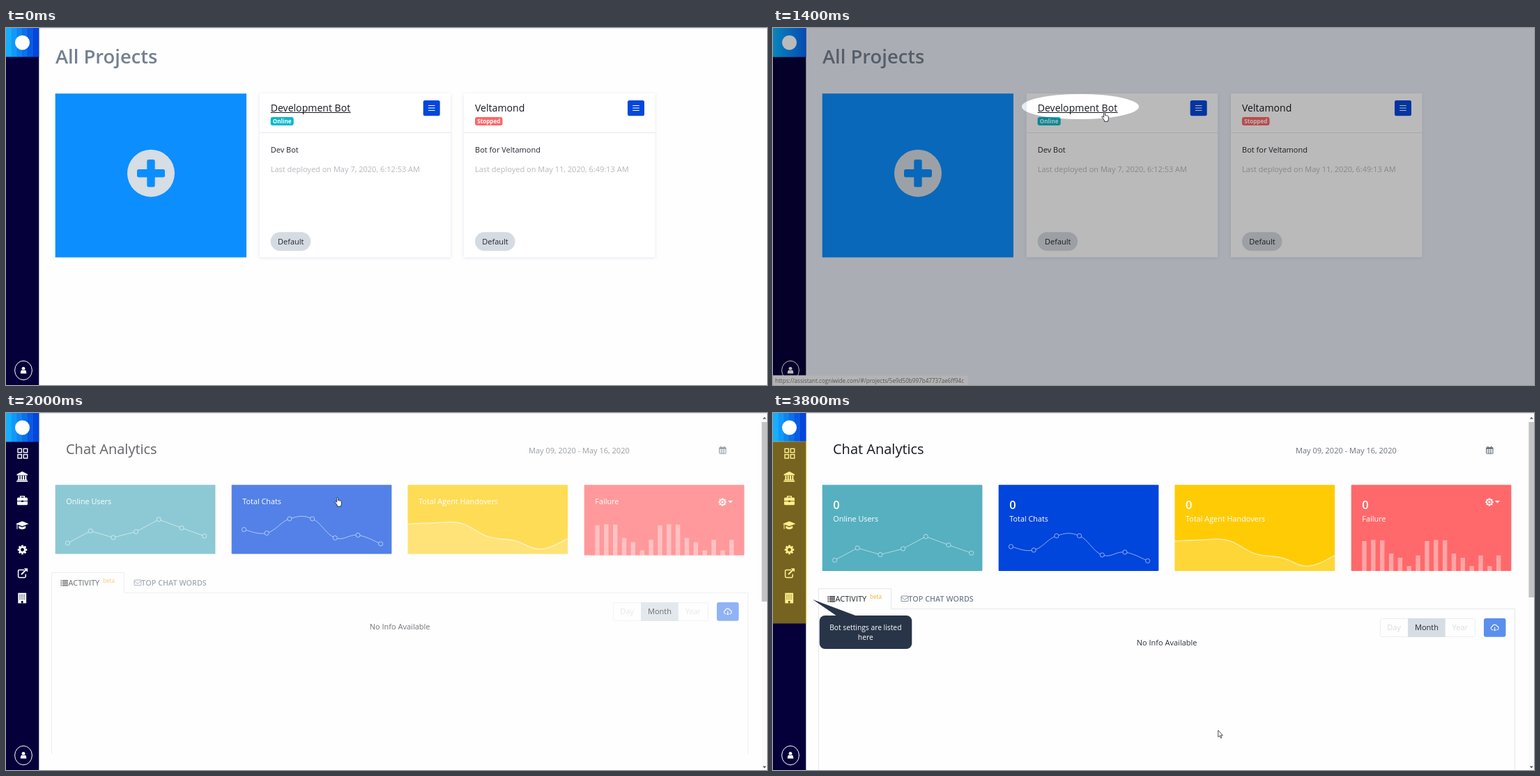
Write an HTML page that moves like this. It is 1092x513 px and loops after 4 s.

```html
<!DOCTYPE html>
<html lang="en">
<head>
<meta charset="utf-8">
<title>Bot dashboard</title>
<style>
html, body { margin: 0; width: 100%; height: 100%; overflow: hidden; background: #fefefe; }
svg { display: block; width: 1092px; height: 513px; font-family: 'Open Sans', sans-serif; }
.card { filter: drop-shadow(0 1px 2px rgba(40, 60, 130, .13)); }
</style>
</head>
<body>
<svg id="stage" viewBox="0 0 1092 513" xmlns="http://www.w3.org/2000/svg"></svg>
<script>
const stage = document.getElementById('stage');
const LOOP = 4000, STEP = 200;
const URL_TEXT = 'https://assistant.cogniwide.com/#/projects/5e9d50b997b47737ae6ff94c';

// Markup helpers
const rect = (x, y, w, h, fill, extra = '') =>
  `<rect x="${x}" y="${y}" width="${w}" height="${h}" fill="${fill}" ${extra}/>`;
const text = (x, y, size, fill, str, extra = '') =>
  `<text x="${x}" y="${y}" font-size="${size}" fill="${fill}" ${extra}>${str}</text>`;
const path = (d, extra = '') => `<path d="${d}" ${extra}/>`;
const line = (d, color, w = 1) => path(d, `fill="none" stroke="${color}" stroke-width="${w}"`);
const group = (id, body, extra = '') => `<g id="${id}" ${extra}>${body}</g>`;
const repeat = (n, fn) => Array.from({ length: n }, (_, i) => fn(i)).join('');

function gear(cx, cy, r, fill, hole) {
  const teeth = repeat(8, i =>
    rect(cx - r * .22, cy - r, r * .44, r, fill, `transform="rotate(${i * 45} ${cx} ${cy})"`));
  return teeth + `<circle cx="${cx}" cy="${cy}" r="${r * .76}" fill="${fill}"/>` +
    `<circle cx="${cx}" cy="${cy}" r="${r * .36}" fill="${hole}"/>`;
}

// Curve through points; k = 0 gives straight segments
function curve(pts, k) {
  const slope = i => {
    const a = pts[Math.max(i - 1, 0)], b = pts[Math.min(i + 1, pts.length - 1)];
    return [(b[0] - a[0]) * k, (b[1] - a[1]) * k];
  };
  return pts.map((p, i) => {
    if (!i) return `M${p}`;
    const q = pts[i - 1], s = slope(i - 1), e = slope(i);
    return `C${q[0] + s[0]} ${q[1] + s[1]} ${p[0] - e[0]} ${p[1] - e[1]} ${p}`;
  }).join('');
}

// Project list
function projectCard(x, name, state, color, stateW, about, when, underline) {
  const tx = x + 16;
  return rect(x, 94, 274.5, 235.5, '#fff', 'class="card"') +
    rect(x, 150, 274.5, 1, '#e6e8ec') +
    text(tx, 119.5, 14.1, '#15181f', name) +
    (underline ? rect(tx, 121, 115, 1, '#15181f') : '') +
    rect(tx, 128, stateW, 12, color, 'rx="3"') +
    text(tx + stateW / 2, 137, 8.1, '#fff', state, 'font-weight="700" text-anchor="middle"') +
    rect(x + 235, 104, 24, 22.3, '#0447dc', 'rx="2.5"') +
    repeat(3, i => rect(x + 242.2, 111 + i * 3.5, 9.6, 1, '#fff')) +
    text(tx, 178.5, 11, '#23272f', about) +
    text(tx, 207, 11, '#b4b8bd', 'Last deployed on ' + when) +
    rect(tx, 293.3, 57.5, 27, '#d5dbe2', 'rx="13.5"') +
    text(tx + 10.3, 311, 11, '#23272f', 'Default');
}

const projects =
  text(71, 50.5, 27.4, '#74808f', 'All Projects', 'font-weight="600"') +
  rect(70.7, 94.2, 274.3, 235.4, '#0c8eff') +
  '<circle cx="208" cy="208.7" r="34" fill="#d6dde4"/>' +
  rect(188, 203, 40, 11.4, '#0c8eff', 'rx="2.5"') +
  rect(202.3, 189, 11.4, 39.4, '#0c8eff', 'rx="2.5"') +
  projectCard(363.7, 'Development Bot', 'Online', '#07b9cb', 33, 'Dev Bot',
    'May 7, 2020, 6:12:53 AM', true) +
  projectCard(657, 'Veltamond', 'Stopped', '#ff6668', 39.5, 'Bot for Veltamond',
    'May 11, 2020, 6:49:13 AM', false);

// Side menu
const NAVY = '#05003a';
const bands = 6;
const mix = (a, b, u) => Math.round(a + (b - a) * u);
const tile = repeat(bands, i => {
  const u = i / (bands - 1);
  return rect(i * 47 / bands, 0, 47 / bands + .3, 41.5,
    `rgb(${mix(22, 4, u)},${mix(174, 70, u)},${mix(255, 222, u)})`);
});

const menu =
  repeat(4, i => rect(17 + i % 2 * 8.3, 51.3 + (i >> 1) * 8.3, 5.4, 5.4, 'none',
    'stroke="#fff" stroke-width="1.4"')) +
  path('M23.3 84L31 88V89.4H15.5V88Z', 'fill="#fff"') +
  repeat(4, i => rect(17.4 + i * 3.3, 90, 2, 6, '#fff')) +
  rect(16.3, 95.6, 14, 1.3, '#fff') + rect(15.2, 97.4, 16, 1.6, '#fff') +
  rect(16, 121.5, 15, 10.8, '#fff', 'rx="1.5"') +
  line('M20.7 122V119.6H26.3V122', '#fff', 1.4) +
  rect(16, 126.3, 15, .9, NAVY) + rect(22, 125.7, 3, 2.2, NAVY) +
  path('M14 159.2L23.3 155.6L32.5 159.2L23.3 162.8Z', 'fill="#fff"') +
  path('M18.3 162.2V165.4Q23.3 169 28.2 165.4V162.2L23.3 164.2Z', 'fill="#fff"') +
  line('M16 160V166.8', '#fff', 1.1) +
  gear(23.5, 196.5, 6.7, '#fff', NAVY) +
  line('M26 225.4H19.2Q17.6 225.4 17.6 227V234.8Q17.6 236.4 19.2 236.4H26.6Q28.2 236.4 28.2 234.8V231.5', '#fff', 1.5) +
  line('M22 232L29 225', '#fff', 1.9) +
  path('M25.6 223.2H31V228.6Z', 'fill="#fff"') +
  rect(17.3, 258.6, 11.8, 14.8, '#fff') +
  repeat(12, i => rect(19.2 + i % 4 * 2.3, 261 + (i >> 2) * 2.7, 1.1, 1.3, NAVY)) +
  rect(21.9, 270, 2.6, 3.4, NAVY);

const user =
  '<ellipse cx="25" cy="492" rx="12.4" ry="13.7" fill="none" stroke="#fff" stroke-width="1"/>' +
  '<circle cx="25" cy="489.3" r="2.4" fill="#fff"/>' +
  path('M20.8 496.6Q20.8 491.4 23 491.4Q25 493 27 491.4Q29.3 491.4 29.3 496.6Z', 'fill="#fff"');

const sidebar =
  rect(0, 0, 47.3, 513, NAVY) + group('tile', tile) +
  rect(0, 0, 47.3, 41.5, 'url(#sky)', 'id="smooth"') +
  '<circle cx="23.5" cy="21" r="10.5" fill="#fff"/>' + group('menu', menu) + user;

// Dashboard
const SOFT = 'rgba(255,255,255,.55)';
const level = v => 226.5 - .545 * v;
const week = [78, 81, 80, 45, 34, 12, 40];
const spread = (x, step, ys) => ys.map((y, i) => [x + i * step, y]);

function dotted(pts, fill, k) {
  return line(curve(pts, k), SOFT) + pts.map(([x, y]) =>
    `<circle cx="${x}" cy="${y}" r="3.1" fill="${fill}" stroke="${SOFT}"/>`).join('');
}

const area = spread(576.5, 38.3, week.map(level));
const cards = [
  [70.7, '#56b0c0', 'Online Users',
    dotted(spread(88.5, 32.7, [211.5, 194, 203.5, 195, 177.5, 189.7, 201.3]), '#56b0c0', 0)],
  [323.7, '#0045dc', 'Total Chats',
    dotted(spread(341.5, 32.7, [192, 197, 176.5, 176.5, 204, 200, 212.5]), '#0045dc', .2)],
  [576.5, '#ffcb05', 'Total Agent Handovers',
    path(curve(area, .2) + 'V227H576.5Z', 'fill="rgba(255,255,255,.2)"') + line(curve(area, .2), SOFT, 1.6)],
  [829.7, '#ff696b', 'Failure',
    repeat(16, i => {
      const y = level(week[i < 14 ? i % 7 : i - 9]);
      return rect(845.3 + i * 12.85, y, 6.4, 227 - y, 'rgba(255,255,255,.4)');
    })]
];

const cardMarkup = cards.map(([x, color, label, chart], i) =>
  rect(x, 103.3, 229.7, 123.7, color, `id="box${i}" rx="1"`) +
  group('chart' + i, chart) +
  text(x + 15.6, 138, 16.5, '#fff', '0', 'class="count" font-weight="600"') +
  text(x + 15.6, 156, 10.85, '#fff', label, 'class="label" font-weight="500"')).join('');

const GREY = '#6c7783';
const calendar =
  rect(1023.5, 49.5, 9.6, 9, 'none', `stroke="${GREY}" rx="1"`) +
  rect(1023.5, 49.5, 9.6, 2.5, GREY) +
  rect(1025.2, 47.6, 1.4, 3, GREY) + rect(1030, 47.6, 1.4, 3, GREY) +
  repeat(2, i => rect(1024, 53.7 + i * 2.4, 8.6, .7, GREY)) +
  repeat(2, i => rect(1026.4 + i * 3, 52, .7, 6.5, GREY));

const panel =
  line('M65.5 513V252.5H169.5V281.5H1064.5V513', '#e4e7eb') +
  repeat(4, i => rect(78.5, 263 + i * 2.4, 1.6, 1.4, '#23282c') +
    rect(81, 263 + i * 2.4, 8, 1.4, '#23282c')) +
  text(89.5, 271, 11, '#23282c', 'ACTIVITY', 'font-weight="500"') +
  text(139, 267, 8.2, '#f7b02c', 'beta') +
  rect(184, 263, 10, 7.6, 'none', 'stroke="#7b8591" stroke-width=".9" rx="1"') +
  line('M184 264.5L189 268.3L194 264.5', '#7b8591', .9) +
  text(194.3, 271, 10.8, '#768090', 'TOP CHAT WORDS', 'font-weight="600"') +
  rect(871.5, 295.5, 136, 26, 'none', 'stroke="#eceef1" rx="2"') +
  rect(911, 295, 53.7, 27, '#d6dde5') +
  text(881.3, 312, 11, '#d9dde1', 'Day') +
  text(921, 312, 11, '#23282c', 'Month') +
  text(974.7, 312, 11, '#d9dde1', 'Year') +
  rect(1020, 295, 31.5, 26.7, '#5b8fee', 'rx="3"') +
  line('M1033 311.7H1032.6A2.6 2.6 0 0 1 1032.2 306.6A3.6 3.6 0 0 1 1039 306.4A2.7 2.7 0 0 1 1039 311.7H1038.4', '#fff', 1.1) +
  line('M1035.7 307.6V313M1033.8 311.2L1035.7 313.1L1037.6 311.2', '#fff', 1) +
  text(521.7, 333.5, 11, '#2c3137', 'No Info Available');

const dash =
  text(86, 58.5, 20, '#15181f', 'Chat Analytics', 'font-weight="500"') +
  text(750, 57.5, 11, '#6b7077', 'May 09, 2020 - May 16, 2020') +
  calendar + cardMarkup +
  gear(1028, 128, 5.6, '#fff', '#ff696b') +
  '<circle cx="1028" cy="128" r="3" fill="#ff696b"/><circle cx="1028" cy="128" r="1.7" fill="#fff"/>' +
  path('M1036 126H1043L1039.5 129.5Z', 'fill="#fff"') +
  group('panel', panel);

const scroll =
  rect(1084, 1, 8, 512, '#fafafa') +
  rect(1084.5, 13, 7.5, 312, '#c2c2c5', 'id="thumb"') +
  path('M1085.8 8.6L1088.4 5.8L1091 8.6ZM1085.8 507.6L1088.4 510.4L1091 507.6Z', 'fill="#55585c"');

const callout =
  rect(0, 40.5, 48.6, 262, 'rgba(255,220,0,.45)') +
  path('M57 268L121 292H92Z', 'fill="#283548"') +
  rect(66.7, 291, 132.6, 48, '#283548', 'rx="8"') +
  text(132.8, 312, 10.3, '#fff', 'Bot settings are listed', 'text-anchor="middle"') +
  text(132.8, 326, 10.3, '#fff', 'here', 'text-anchor="middle"');

const status =
  rect(-4, 499.3, 284, 18, '#f7f7f8', 'id="bar" rx="2" stroke="#e8e8ea" stroke-width=".6"') +
  text(3, 510, 8.1, '#707377', URL_TEXT);

const hand = path('M2.6 9.8L.6 7.4C-.6 5.8 .9 5 1.9 6L2.8 7V1.2C2.8 -.3 4.8 -.3 4.8 1.2V4.4' +
  'C5.4 3.8 6.4 4 6.6 4.8C7.2 4.3 8.1 4.6 8.2 5.3C9 5 9.7 5.5 9.7 6.3V8.8C9.7 10.4 8.8 11 8.8 13H3.8C3.8 11.6 3.3 10.7 2.6 9.8Z',
  'fill="#fff" stroke="#20222c" stroke-width=".9"');
const arrow = path('M0 0V9.6L2.2 7.7L3.8 11.2L5.2 10.5L3.7 7.2H6.6Z',
  'fill="#fff" stroke="#20222c" stroke-width=".8"');

stage.innerHTML =
  '<defs><linearGradient id="sky"><stop stop-color="#0cb6ff"/><stop offset="1" stop-color="#0866f4"/></linearGradient></defs>' +
  rect(0, 0, 1092, 513, '#fefefe', 'id="page"') + rect(47, 0, 1045, 1, '#e3e5f6') +
  group('projects', projects) + group('dash', dash) + group('scroll', scroll) +
  sidebar + group('callout', callout) + group('status', status) +
  path('M0 0H1092V513H0ZM357 113A84 18 0 0 0 525 113A84 18 0 0 0 357 113Z',
    'id="dim" fill="rgba(0,0,0,.27)" fill-rule="evenodd"') +
  group('hand', hand) + group('arrow', arrow);

const $ = id => document.getElementById(id);
const show = (id, on) => $(id).setAttribute('display', on ? 'inline' : 'none');
const shift = (el, x, y) => el.setAttribute('transform', `translate(${x} ${y})`);
const each = (cls, fn) => stage.querySelectorAll('.' + cls).forEach(fn);
const clamp = v => Math.min(1, Math.max(0, v));

function layout(open) {
  cards.forEach((_, i) => {
    const cut = open ? 0 : i === 3 ? 22.5 : 24.5;
    $('box' + i).setAttribute('height', 123.7 - cut);
    shift($('chart' + i), 0, -cut);
  });
  each('count', el => el.setAttribute('display', open ? 'inline' : 'none'));
  each('label', el => shift(el, 0, open ? 0 : -25));
  shift($('panel'), 0, open ? 0 : -23);
}

function draw(t) {
  const home = t < 1600, dimmed = t >= 800 && home, moving = t >= 3200;
  show('projects', home);
  show('dim', dimmed);
  $('page').setAttribute('fill', dimmed ? '#eaedf7' : '#fefefe');
  show('smooth', t >= 800 && t < 2000);
  show('menu', !home);
  show('scroll', !home);
  $('thumb').setAttribute('height', t < 2000 ? 312 : t < 2200 ? 258 : 252);

  show('dash', t >= 1800);
  $('dash').setAttribute('opacity', clamp((t - 1600) / 590));
  layout(t >= 2200);

  show('status', t >= 200 && t < 2000);
  $('bar').setAttribute('width', home ? 284 : 368);
  show('callout', t >= 2400);
  $('callout').setAttribute('opacity', clamp((t - 2200) / 400));

  show('hand', t >= 200 && !moving);
  shift($('hand'), 471.8, 121.3);
  show('arrow', moving);
  const u = clamp((t - 3000) / 800);
  shift($('arrow'), 475 + 163.8 * u ** 1.4, 121 + 335 * u ** 1.8);
}

let last = -1;
function tick() {
  const t = Math.floor(performance.now() % LOOP / STEP) * STEP;
  if (t !== last) draw(last = t);
  requestAnimationFrame(tick);
}
tick();
</script>
</body>
</html>
```
